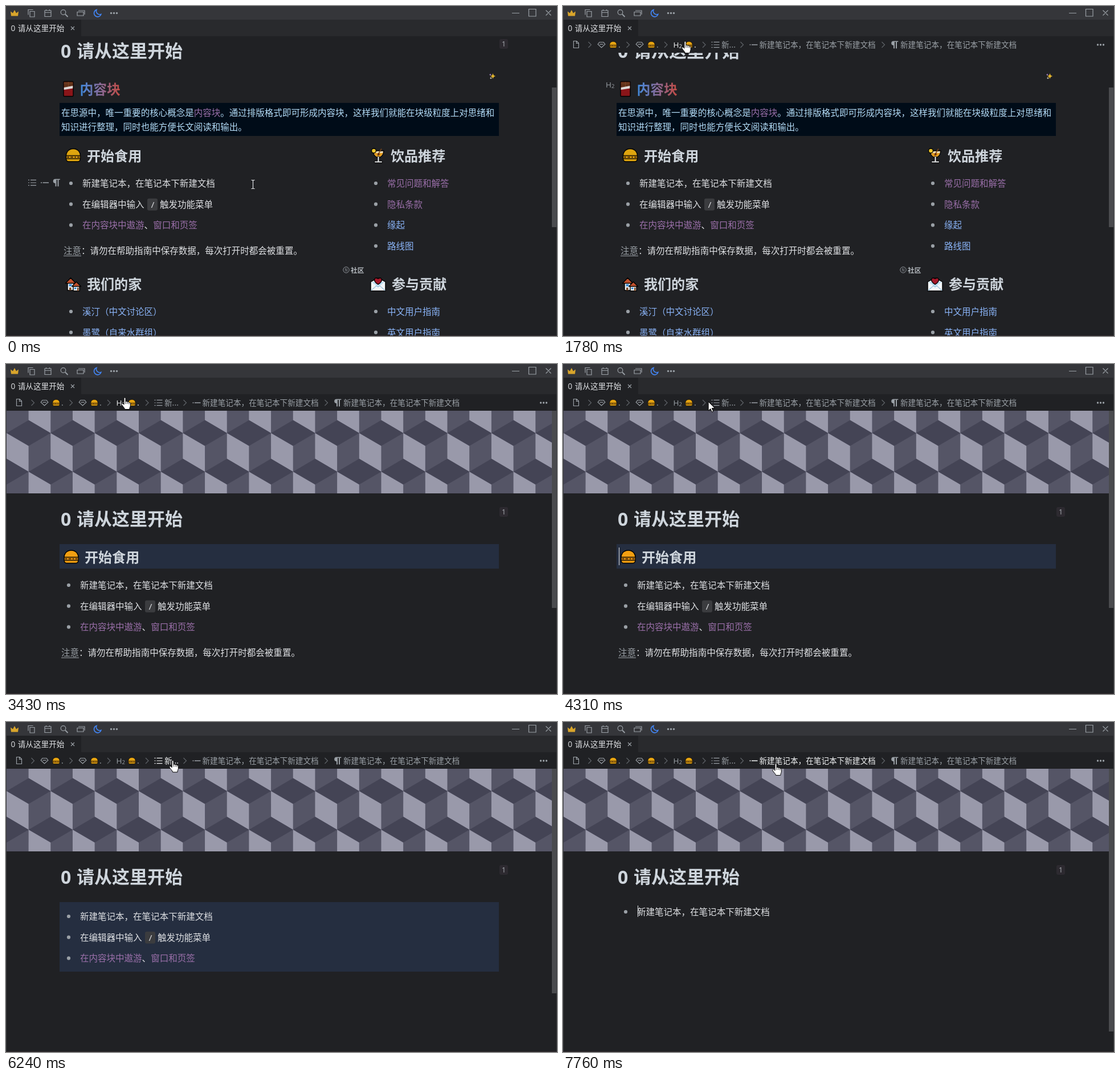
These frames come from a looping animation (967 px wide and 579 px high, 8000 ms). An HTML page:

```html
<!DOCTYPE html>
<html lang="zh-CN">
<head>
<meta charset="utf-8">
<title>Breadcrumb focus</title>
<style>
html, body { margin: 0; width: 100%; height: 100%; overflow: hidden; background: #202124; }
svg { display: block; width: 100vw; height: 100vh; }
text {
  font-family: 'Noto Sans CJK SC', 'Noto Sans CJK', 'Noto Sans', sans-serif;
  text-spacing-trim: space-all; white-space: pre;
}
.latin { font-family: 'Open Sans', 'Noto Sans', sans-serif; }
.line { fill: none; stroke: currentColor; stroke-width: 1.2; }
</style>
</head>
<body>
<svg id="stage" viewBox="0 0 967 579" xmlns="http://www.w3.org/2000/svg"></svg>
<script>
const BG = '#202124', INK = '#dfe1e4', GREY = '#9aa0a6', BLUE = '#8ab4f8',
      PURPLE = '#9a6fa9', HL = '#252e40', HEAD = '#ced5dc', PALE = '#b4dcf7';
const BODY = 15.53, SMALL = 13.62, H2 = 24.05;
const stage = document.getElementById('stage');

// ---- drawing helpers (text is placed by its vertical centre) ----
const text = (x, cy, size, str, fill = INK, more = '') =>
  `<text x="${x}" y="${(cy + size * 0.38).toFixed(2)}" font-size="${size}" fill="${fill}" ${more}>${str}</text>`;
const rect = (x, y, w, h, fill, more = '') =>
  `<rect x="${x}" y="${y}" width="${w}" height="${h}" fill="${fill}" ${more}/>`;
const path = (d, fill, more = '') => `<path d="${d}" fill="${fill}" ${more}/>`;
const line = d => `<path class="line" d="${d}"/>`;
const dot = (x, y, r, fill = 'currentColor') => `<circle cx="${x}" cy="${y}" r="${r}" fill="${fill}"/>`;
const at = (x, y, inner, k = 1) => `<g transform="translate(${x} ${y}) scale(${k})">${inner}</g>`;
const group = (id, inner, color = GREY) => `<g id="${id}" color="${color}">${inner}</g>`;
const bold = 'font-weight="700"', latin = 'class="latin"';
const edge = 'stroke="#000" stroke-width="1.4" stroke-linejoin="round"';

const icon = {
  doc: line('M-4.5-6h5.5l3.5 3.5v8.5h-9zM.5-6v4h4'),
  gem: line('M-3.6-4.5h7.2l2.7 3.6L0 5-6.3-.9zM-3-.9h6'),
  list: line('M-3-4.7H7M-3 0H7M-3 4.7H7M-7-4.7h2M-7 0h2M-7 4.7h2'),
  item: `<path class="line" style="stroke-width:1.7" d="M-7 0h2M-3.5 0H7"/>`,
  para: path('M6.3-6.5H-2a3.8 3.8 0 0 0 0 7.6V6.5H0V-5H2V6.5H4V-5h2.3z', 'currentColor'),
  h2: text(-8, 0, 13.5, 'H', 'currentColor', latin) + text(1.9, 2, 9.5, '2', 'currentColor', latin),
  chevron: `<path d="M-2.5-5L2.5 0-2.5 5" fill="none" stroke="#5f6368" stroke-width="1.2"/>`,
  dots: dot(-5, 0, 1.7) + dot(0, 0, 1.7) + dot(5, 0, 1.7)
};

// ---- emoji ----
const burger = (bread = '#f29f12') =>
  path('M-12.500 2C-13-3-10-11.500 0-11.500S13-3 12.500 2V6Q12 11 8 11H-8Q-12 11-12.500 6z', bread, edge) +
  path('M-12.500.5H12.500M-12.500 6H12.500', 'none', 'stroke="#140c04" stroke-width="1.300"') +
  path('M-11 3.300h4M-5 3.300h5M2 3.300h3M7 3.300h4', 'none', 'stroke="#4a2608" stroke-width="2"');
const chocolate = rect(-8.5, -13, 17, 26, '#8a1519', 'rx="1.500" ' + edge) +
  rect(-7.8, -12.3, 15.6, 11, '#5f3018') + path('M-7.8-9.500H7.800M0-12.300v9', 'none', 'stroke="#7a4526"') +
  path('M-7.800-2.500L7.800-5.500V-1L-7.800 1.500z', '#ddd9d6');
const cocktail = path('M-9-8H10Q9 1 3 3.500H-2Q-8 1-9-8z', '#e9d9b4', edge) +
  path('M-7-4H8.500Q7 1 3 2.500H-2Q-6 1-7-4z', '#e29a1c') +
  path('M.5 3.500V10M-5 11.500H6', 'none', 'stroke="#000" stroke-width="4.400" stroke-linecap="round"') +
  path('M.5 3V10M-5 11.500H6', 'none', 'stroke="#e4e6e8" stroke-width="2.200" stroke-linecap="round"') +
  path('M-1 0L6-11.500', 'none', 'stroke="#7a4318" stroke-width="1.500"') +
  `<circle cx="-7.500" cy="-8" r="4" fill="#efc62c" ${edge}/>` + dot(1, -2, 1.8, '#5c2411');
const houses = rect(-10, -3, 11, 14, '#eef0f2', edge) + path('M-13.500-1.500L-4.500-11 4.500-1.500z', '#c2512d', edge) +
  rect(0, 3, 11, 9, '#eef0f2', edge) + path('M-2.500 4L5.500-4 13.500 4z', '#c2512d', edge) +
  rect(-7.500, 0, 5, 4, '#3f8fd6') + rect(-7, 6, 3.500, 5, '#7b4a28') + rect(2, 6, 3.500, 3, '#3f8fd6') + rect(7, 6, 2.500, 6, '#7b4a28');
const letter = path('M-13-4L0-11 13-4V12H-13z', '#f4f6f8', edge) + path('M-12-4H12L0 5z', '#bfe0f5') +
  path('M-12.300 11.300L-3 3 0 5 3 3 12.300 11.300', 'none', 'stroke="#9cc3dd" stroke-width="1.200"') +
  path('M0 .5C-10-5.500-7-14 0-9.500 7-14 10-5.500 0 .5z', '#a5182a', edge);
const star = r => `M0-${r}Q${r * .15}-${r * .15} ${r} 0 ${r * .15} ${r * .15} 0 ${r} -${r * .15} ${r * .15}-${r} 0-${r * .15}-${r * .15} 0-${r}z`;
const sparkle = at(1, 0, path(star(5), '#e0b32e')) + at(-3.500, -2.500, path(star(2), '#a57fc0')) + at(-2.500, 3.500, path(star(2), '#d8cdb4'));

// ---- document parts ----
function steps(x, y, rows = 3) {
  let s = '';
  for (let i = 0; i < rows; i++) s += dot(x - 20, y + i * 36.7, 3.1, GREY);
  s += text(x, y, BODY, '新建笔记本，在笔记本下新建文档');
  if (rows < 2) return s;
  const y2 = y + 36.7, y3 = y + 73.3;
  return s + text(x, y2, BODY, '在编辑器中输入') + rect(x + 114, y2 - 10, 18, 21, '#3b3c3f', 'rx="3"') +
    text(x + 119, y2 + 1, 15, '/', INK, `style="font-family:'Noto Sans Mono',monospace"`) +
    text(x + 136, y2, BODY, '触发功能菜单') +
    text(x, y3, BODY, `在内容块中遨游<tspan fill="${INK}">、</tspan>窗口和页签`, PURPLE);
}
const note = (x, y) => text(x, y, BODY,
    `<tspan fill="${GREY}">注意</tspan>：请勿在帮助指南中保存数据，每次打开时都会被重置。`) +
  rect(x, y + 9, 31, 1, GREY);
const title = y => text(96, y - .5, 32, '0', HEAD, bold + ' ' + latin) + text(124, y - .5, 31, '请从这里开始', HEAD, bold) +
  rect(866, y - 21, 15, 17, '#2d2a30', 'rx="3"') + text(870, y - 12.5, 12.5, '1', '#aeb2b7', latin);
const heading = (x, y, str) => text(x, y, H2, str, HEAD, bold);
const links = (x, y, rows) => rows.map(([str, fill], i) =>
  dot(x - 20, y + i * 36.7, 3.1, GREY) + text(x, y + i * 36.7, BODY, str, fill)).join('');

function cubes() {
  const w = 38.68, h = 22.6, side = 45.1;
  let s = rect(1, 82, 957, 145, '#555566');
  for (let r = 0; r < 4; r++)
    for (let i = -1; i < 14; i++) {
      const x = 39.6 + (i + (r % 2 ? 0 : .5)) * 2 * w, y = 53.5 + r * (h + side);
      s += path(`M${x - w} ${y}l${w}-${h} ${w} ${h}-${w} ${h}z`, '#444455') +
        path(`M${x - w} ${y}l${w} ${h}v${side}l-${w}-${h}z`, '#9999aa');
    }
  return `<g clip-path="url(#banner)">${s}</g>`;
}

const home = title(79) +
  at(109.5, 145.5, chocolate) + text(129.5, 146, 23.8, '内容块', 'url(#fade)', bold) + at(853.5, 123, sparkle) +
  rect(94, 170, 771, 58, '#000c18') +
  text(97, 187, BODY, `在思源中，唯一重要的核心概念是<tspan fill="${PURPLE}">内容块</tspan>。通过排版格式即可形成内容块，这样我们就能在块级粒度上对思绪和`, PALE) +
  text(97, 212.5, BODY, '知识进行整理，同时也能方便长文阅读和输出。', PALE) +
  group('hlHome', rect(97, 240, 535, 42, HL)) +
  at(118, 262, burger('#dfa50f')) + heading(142, 263, '开始食用') +
  at(653, 262, cocktail) + heading(675, 263, '饮品推荐') +
  steps(134, 311) + note(101, 429) +
  links(669, 311, [['常见问题和解答', PURPLE], ['隐私条款', PURPLE], ['缘起', BLUE], ['路线图', BLUE]]) +
  `<circle cx="597" cy="463" r="5.2" fill="none" stroke="${GREY}" stroke-width=".9"/>` +
  text(594.6, 463, 7, 'N', GREY) + text(605, 463.5, 11.64, '社区', '#b3b8bd', bold) +
  at(118, 488, houses) + heading(142, 488, '我们的家') +
  at(653, 488, letter) + heading(677, 488, '参与贡献') +
  links(134, 536, [['溪汀（中文讨论区）', BLUE], ['墨鹭（自来水群组）', BLUE]]) +
  links(669, 536, [['中文用户指南', BLUE], ['英文用户指南', BLUE]]) +
  group('gutter', at(46, 310, icon.list) + at(68, 310, icon.item) + at(88.5, 310, icon.para)) +
  group('gutterH2', at(83, 138, icon.h2)) + group('gutterDoc', at(79, 79, icon.doc));

const section = group('hlHead', rect(94, 316, 771, 43, HL)) + group('hlList', rect(94, 363, 771, 122, HL)) +
  at(114.5, 338.5, burger()) + heading(138, 339, '开始食用') + steps(130, 388) + note(97, 506);

const crumbText = '新建笔记本，在笔记本下新建文档';
const bun = x => at(x, 68, burger('#e8a512'), .5) + text(x + 9, 68, SMALL, '.', 'currentColor');
const crumbs = rect(1, 53, 965, 29, BG) + at(23, 67.5, icon.doc) +
  [47, 114, 180.5, 247.5, 314, 562].map(x => at(x, 68, icon.chevron)).join('') +
  at(67.5, 68, icon.gem) + bun(88) + at(134.5, 68, icon.gem) + bun(155) +
  group('crumb0', at(201.5, 68, icon.h2) + bun(221)) +
  group('crumb1', at(267.5, 68, icon.list) + text(278, 68, SMALL, '新...', 'currentColor')) +
  group('crumb2', at(334.5, 68, icon.item) + text(344.5, 68, SMALL, crumbText, 'currentColor')) +
  at(582, 68, icon.para) + text(592, 68, SMALL, crumbText, 'currentColor') + at(943.5, 68, icon.dots);

const chrome = rect(0, 0, 967, 24, '#35363a') + rect(0, 24, 967, 29, '#292a2d') + rect(0, 24, 132, 29, BG) +
  path('M9 17.5L8 9.5l4 3L15 7l3 5.5 4-3-1 8z', '#d9a52b') +
  at(44.5, 12.5, line('M-2.5-3H5.5V6.5H-2.5zM-5.5 3V-6H3')) +
  at(73.5, 12.5, line('M-5.5-4.5H5.5V6H-5.5zM-5.5-1H5.5M-3-6.5v2M3-6.5v2')) +
  at(102, 12.5, `<circle class="line" cx="-1.5" cy="-1.5" r="4.3"/>` +
    `<path class="line" style="stroke-width:1.8" d="M2 2L6.5 6.5"/>`) +
  at(131.5, 12.5, line('M-6.5-2H4.5V4.5H-6.5zM-4.5-4.5H6.5V2.5')) +
  path('M159 6.5a6.3 6.3 0 1 0 7.8 8A6 6 0 0 1 159 6.5z', 'none', 'stroke="#4285f4" stroke-width="1.6"') +
  at(189.5, 12.5, icon.dots) +
  line('M888 12.5h13M917.5 5.5h12.5v12.5h-12.5zM947.500 7.500l9 9M956.500 7.500l-9 9') +
  text(8.5, 38.500, SMALL, '0', INK, latin) + text(20.7, 38.500, SMALL, '请从这里开始', INK) + line('M114 36l6 6M120 36l-6 6');

const pointers =
  group('arrow', path('M0 0V16L3.7 12.6 6.2 18.2 8.7 17.2 6.2 11.6H11.3z', '#fff', 'stroke="#000"')) +
  group('hand', path('M-2 1.5C-2-.5 1-.5 1 1.5V7C2 6 4 6.3 4 7.6 5 6.8 6.8 7.2 6.8 8.6 7.8 8 9.3 8.6 9.3 10V14C9.3 16 7.8 17 7.8 20.5H-.5C-.5 18-5 15-6.3 11.6-6.6 10-4.6 9.5-3.5 10.7L-2 12.2z',
    '#fff', 'stroke="#000"') + path('M1 7v4M4 8v3M6.8 9v2.5', 'none', 'stroke="#000" stroke-width=".8"')) +
  group('ibeam', path('M-3-7.5H-1L0-6.5 1-7.5H3M0-6.5V6.5M-3 7.5H-1L0 6.5 1 7.5H3', 'none', 'stroke="#e8eaed" stroke-width="1.1"'));

stage.innerHTML = `<defs>
  <linearGradient id="fade" gradientUnits="userSpaceOnUse" x1="130" x2="201" y1="0" y2="0">
    <stop offset="0" stop-color="#3f8be0"/><stop offset=".5" stop-color="#876a98"/><stop offset="1" stop-color="#c44a41"/>
  </linearGradient>
  <clipPath id="banner"><rect x="1" y="82" width="957" height="145"/></clipPath></defs>` +
  rect(0, 0, 967, 579, BG) + group('home', home) +
  group('focus', cubes() + title(272) + group('section', section) +
    group('listPage', group('hlRows', rect(94, 316, 771, 122, HL)) + steps(130, 341)) +
    group('itemPage', steps(130, 333, 1))) +
  rect(958, 0, 8, 0, '#4a4b4e', 'id="thumb"') + rect(0, 0, 1, 0, INK, 'id="caret"') +
  group('crumbs', crumbs) + group('chrome', chrome) +
  rect(0, 24, 1, 555, '#35363a') + rect(966, 24, 1, 555, '#35363a') + rect(0, 578, 967, 1, '#342c2e') +
  '<circle id="click" r="12" fill="#ff0" fill-opacity=".47"/>' + group('pointer', pointers);

// ---- timeline ----
const LOOP = 8000;
const PATH = [[0, 433.5, 313], [290, 433.5, 313], [450, 408, 280], [800, 290, 140], [1080, 244, 87], [1240, 238.5, 81],
  [1500, 224, 67], [1900, 211, 60], [1990, 210, 59], [2420, 210, 59], [2540, 209, 59], [3940, 209, 59],
  [4310, 255, 66], [4560, 276, 66], [5290, 276, 66], [5420, 277.5, 65], [6090, 277.5, 65], [6580, 328, 73],
  [6820, 374, 73], [LOOP, 374, 73]];
const CARET = [[2910, 3430], [3940, 4330], [4760, 5290], [5580, 6090], [6790, 7310], [7760, LOOP]];
const CLICKS = [[2750, 2890], [5420, 5560], [7630, 7760]];
const HITS = [[193, 236], [260, 303], [326, 550]];

const el = id => document.getElementById(id);
const show = (id, on) => el(id).setAttribute('display', on ? 'inline' : 'none');
const set = (id, attrs) => { for (const k in attrs) el(id).setAttribute(k, attrs[k]); };
const within = (t, spans) => spans.some(([a, b]) => t >= a && t < b);
const fadeOut = (t, a, b) => Math.min(1, Math.max(0, (b - t) / (b - a)));

function pointerAt(t) {
  const i = Math.max(1, PATH.findIndex(p => p[0] > t));
  const [t0, x0, y0] = PATH[i - 1], [t1, x1, y1] = PATH[i], k = (t - t0) / (t1 - t0);
  return [x0 + (x1 - x0) * k, y0 + (y1 - y0) * k];
}

function render(t) {
  const page = [2910, 5580, 7760].filter(s => t >= s).length;
  const [x, y] = pointerAt(t);
  const bar = t >= 1400;
  const hit = bar ? HITS.findIndex(([a, b]) => x >= a && x <= b) : -1;
  const kind = hit >= 0 ? 'hand' : y > 100 ? 'ibeam' : 'arrow';

  show('home', page === 0);
  show('focus', page > 0);
  show('section', page === 1);
  show('listPage', page === 2);
  show('itemPage', page === 3);
  show('crumbs', bar);
  show('gutter', y > 295);
  show('gutterH2', y < 160);
  show('gutterDoc', y < 105 && !bar);

  show('hlHome', t >= 2890);
  show('hlList', t >= 5560);
  set('hlHead', { opacity: fadeOut(t, 4330, 4560) });
  set('hlRows', { opacity: fadeOut(t, 6430, 6610) });

  HITS.forEach((_, i) => set('crumb' + i, { color: i === hit ? '#f1f3f4' : GREY }));
  set('thumb', page ? { y: 82, height: [0, 346, 394, 461][page] } : { y: 143, height: 245 });
  show('caret', within(t, CARET));
  set('caret', page === 1 ? { x: 98, y: 322, height: 31 } : { x: 131, y: page === 2 ? 330 : 322, height: 20 });

  show('click', within(t, CLICKS));
  set('click', { cx: x - 1, cy: y - 1 });
  set('pointer', { transform: `translate(${x.toFixed(1)} ${y.toFixed(1)})` });
  for (const k of ['arrow', 'hand', 'ibeam']) show(k, k === kind);
}

const start = performance.now();
function tick() {
  render((performance.now() - start) % LOOP);
  requestAnimationFrame(tick);
}
tick();
</script>
</body>
</html>
```
